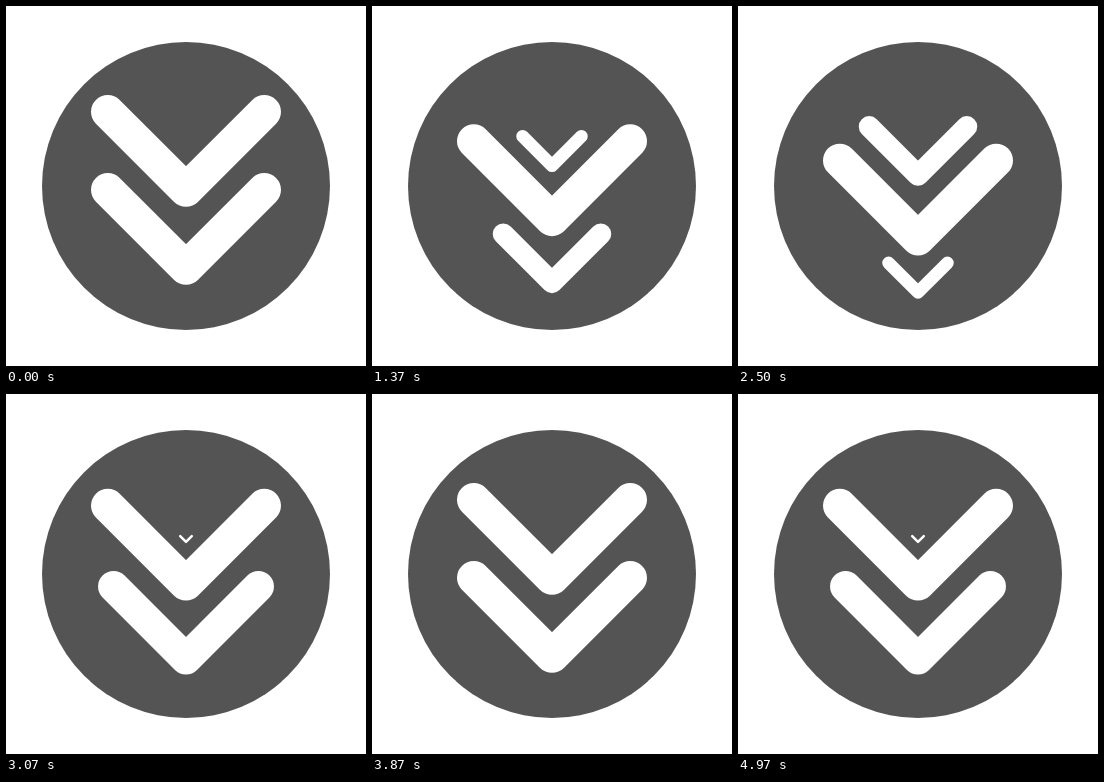
An HTML page that plays this animation: 360 by 360 pixels, repeating every 5.07 s.

```html
<!DOCTYPE html>
<html lang="en">
<head>
<meta charset="utf-8">
<title>Scroll down</title>
<style>
  html, body { margin: 0; width: 100%; height: 100%; overflow: hidden; background: #fff; }
  svg { display: block; width: 100vw; height: 100vh; }
</style>
</head>
<body>
<svg viewBox="0 0 360 360">
  <defs>
    <path id="chevron" d="M-78.2-39.2 0 39 78.2-39.2" fill="none" stroke="#fff"
      stroke-width="33.6" stroke-linecap="round" stroke-linejoin="round"/>
  </defs>
  <circle cx="180" cy="180" r="144" fill="#545454"/>
  <use href="#chevron"/>
  <use href="#chevron"/>
  <use href="#chevron"/>
</svg>
<script>
  const LOOP = 5070, CYCLE = 12, TOP = 145, GAP = 78;
  const [entering, moving, leaving] = document.querySelectorAll("svg > use");

  const place = (el, y, scale) => {
    el.setAttribute("transform", `translate(180 ${y}) scale(${scale})`);
    el.setAttribute("visibility", scale > 0 ? "visible" : "hidden");
  };

  // 12.5 poses per second, shown on a 30 Hz clock rounded to 10 ms
  const poseAt = ms => {
    const tick = Math.floor((Math.floor(ms / 10) * 10 + 5) * 0.03);
    return Math.floor(tick * 5 / 12);
  };

  const smooth = t => t * t * (3 - 2 * t);

  function draw(ms) {
    const e = smooth(poseAt(ms % LOOP) % CYCLE / CYCLE);
    place(entering, TOP, e);
    place(moving, TOP + GAP * e, 1);
    place(leaving, TOP + GAP * (1 + e), 1 - e);
  }

  const start = performance.now();
  function frame() {
    draw(performance.now() - start);
    requestAnimationFrame(frame);
  }
  frame();
</script>
</body>
</html>
```
